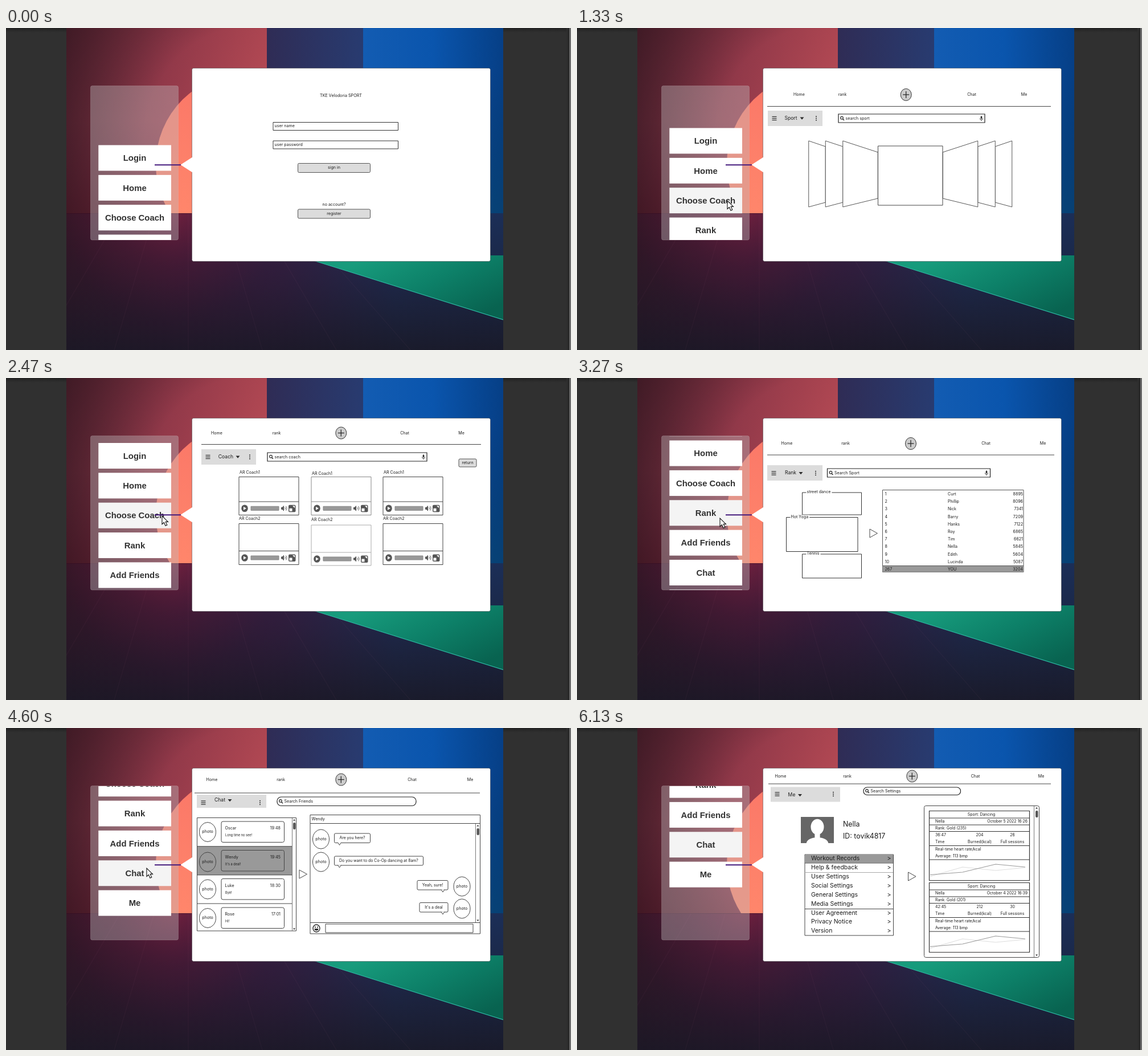
These frames come from a looping animation (992 by 565 pixels, 6.19 s). An HTML page with a canvas:

```html
<!DOCTYPE html>
<html lang="en">
<head>
<meta charset="utf-8">
<title>Sport menu</title>
<style>
html, body { margin: 0; width: 100%; height: 100%; overflow: hidden; background: #303030; }
canvas { display: block; }
</style>
</head>
<body>
<canvas id="stage" width="992" height="565"></canvas>
<script>
const view = document.getElementById('stage').getContext('2d');
const LOOP = 6190, STEP = 1000 / 15, PITCH = 52.35;
const INK = '#2b2b2b', GREY = '#999', LIGHT = '#dcdcdc';
let c = view;

// ---------- helpers ----------
function layer(draw) {
  const el = document.createElement('canvas');
  el.width = 992; el.height = 565;
  c = el.getContext('2d');
  draw();
  c = view;
  return el;
}

function blend(g, colors) {
  colors.forEach((col, i) => g.addColorStop(i / (colors.length - 1), col));
  return g;
}

function linear(x0, y0, x1, y1, ...colors) {
  return blend(c.createLinearGradient(x0, y0, x1, y1), colors);
}

function radial(x, y, r, ...colors) {
  return blend(c.createRadialGradient(x, y, 0, x, y, r), colors);
}

function fillRect(x, y, w, h, fill) {
  c.fillStyle = fill;
  c.fillRect(x, y, w, h);
}

function paint(fill, stroke, width = 1) {
  if (fill) { c.fillStyle = fill; c.fill(); }
  if (stroke) { c.strokeStyle = stroke; c.lineWidth = width; c.stroke(); }
}

function box(x, y, w, h, fill, stroke = INK, r = 0, width = 1) {
  c.beginPath();
  c.roundRect(x, y, w, h, r);
  paint(fill, stroke, width);
}

function oval(x, y, rx, ry, fill, stroke, width = 1) {
  c.beginPath();
  c.ellipse(x, y, rx, ry, 0, 0, Math.PI * 2);
  paint(fill, stroke, width);
}

function poly(pts, fill, stroke, width = 1, open = false) {
  c.beginPath();
  for (let i = 0; i < pts.length; i += 2) c.lineTo(pts[i], pts[i + 1]);
  if (!open) c.closePath();
  paint(fill, stroke, width);
}

function line(x0, y0, x1, y1, color = INK, width = 1) {
  poly([x0, y0, x1, y1], null, color, width, true);
}

function clipTo(x, y, w, h, draw) {
  c.save();
  c.beginPath();
  c.rect(x, y, w, h);
  c.clip();
  draw();
  c.restore();
}

function text(s, x, y, size = 7.1, align = 'left') {
  c.font = `${size}px Inter, sans-serif`;
  c.textAlign = align;
  c.textBaseline = 'middle';
  c.fillStyle = '#1c1c1c';
  c.fillText(s, x, y + 0.3);
}

// ---------- wireframe parts ----------
function nav(y, home, rank, plus, chat, me, x0, x1, ruleY, plusY = y) {
  text('Home', home, y, 7.1, 'center');
  text('rank', rank, y, 7.1, 'center');
  text('Chat', chat, y, 7.1, 'center');
  text('Me', me, y, 7.1, 'center');
  oval(plus, plusY, 9.5, 10.5, '#ccc', '#333');
  line(plus - 5.5, plusY, plus + 5.5, plusY, INK, 1.3);
  line(plus, plusY - 6, plus, plusY + 6, INK, 1.3);
  line(x0, ruleY, x1, ruleY, '#444');
}

function bar(x, y, w, h, label, labelX, arrowX, dotsX, labelY, iconY) {
  fillRect(x, y, w, h, LIGHT);
  for (let i = -1; i < 2; i++) {
    line(x + 7.5, iconY + i * 3, x + 15.5, iconY + i * 3, INK, 1.2);
    oval(dotsX, iconY + i * 3.2, 1, 1, INK);
  }
  text(label, labelX, labelY, 8.6, 'center');
  poly([arrowX - 3.5, labelY - 1.5, arrowX + 3.5, labelY - 1.5, arrowX, labelY + 2.8], INK);
}

function search(x, y, w, h, label, micX, r = 0) {
  box(x, y, w, h, '#fff', '#222', r, 1.2);
  const m = y + h / 2;
  oval(x + 6, m - 0.8, 2.3, 2.3, null, INK, 1.2);
  line(x + 7.6, m + 1, x + 10, m + 3.5, INK, 1.4);
  text(label, x + 12.5, m - 0.3);
  if (!micX) return;
  box(micX - 1.3, m - 4, 2.6, 5, INK, null, 1.3);
  c.beginPath();
  c.arc(micX, m, 2.7, 0, Math.PI);
  paint(null, INK, 0.8);
  line(micX, m + 2.5, micX, m + 4.5, INK, 0.9);
}

function button(x, y, w, h, label) {
  box(x, y, w, h, LIGHT, '#555', 2);
  text(label, x + w / 2, y + h / 2 - 0.5, 7.1, 'center');
}

function arrow(x, y) {
  poly([x, y - 7.5, x + 13.5, y, x, y + 7.5], '#fff', '#444');
}

function avatar(x, y, w, h) {
  const m = x + w / 2;
  fillRect(x, y, w, h, '#666');
  clipTo(x, y, w, h, () => {
    oval(m, y + h * 0.38, h * 0.25, h * 0.3, '#fff');
    fillRect(m - h * 0.1, y + h * 0.6, h * 0.2, h * 0.25, '#fff');
    oval(m, y + h * 1.02, h * 0.42, h * 0.24, '#fff');
  });
}

function photo(x, y) {
  oval(x, y, 14.5, 17, null, '#444');
  text('photo', x, y - 0.5, 7.1, 'center');
}

function scrollbar(x, y, w, h) {
  const m = x + w / 2;
  line(x, y, x, y + h, '#777');
  box(m - 2, y + 8, 4.5, 12, '#555', null, 2);
  poly([m - 2, y + 4.5, m + 2, y + 4.5, m, y + 2], INK);
  poly([m - 2, y + h - 4.5, m + 2, y + h - 4.5, m, y + h - 2], INK);
}

function player(x, y, h, split, edge) {
  box(x, y, 105, h, '#fff', edge);
  line(x, split, x + 105, split, edge);
  const m = (split + y + h) / 2;
  oval(x + 10, m, 5.8, 6.3, '#555');
  poly([x + 8, m - 3, x + 13, m, x + 8, m + 3], '#fff');
  box(x + 21, m - 3.5, 49, 7, GREY, '#888');
  poly([x + 74, m - 2, x + 76, m - 2, x + 79, m - 5, x + 79, m + 5, x + 76, m + 2, x + 74, m + 2], '#555');
  for (const r of [2.5, 5]) {
    c.beginPath();
    c.arc(x + 79, m, r, -0.9, 0.9);
    paint(null, '#555');
  }
  box(x + 87, m - 6, 12.5, 12.5, '#555', null, 2);
  fillRect(x + 88.5, m, 5, 5, '#fff');
  poly([x + 94, m - 4.5, x + 98, m - 4.5, x + 98, m - 0.5], '#fff');
}

function group(x, y, w, h, label) {
  box(x, y, w, h, '#fff', '#333');
  c.font = '7.1px Inter, sans-serif';
  fillRect(x + 7, y - 4, c.measureText(label).width + 3, 8, '#fff');
  text(label, x + 8, y - 1);
}

function bubble(x, y, w, h, label, right) {
  const tail = right ? x + w - 12 : x + 6;
  box(x, y, w, h, '#fff', '#444', 2);
  poly([tail, y + h - 0.6, tail + 3, y + h + 4, tail + 6, y + h - 0.6], '#fff', '#444', 1, true);
  text(label, x + w / 2, y + h / 2 - 0.5, 6.9, 'center');
}

// ---------- pages ----------
function loginPage() {
  text('TKE Velodoria SPORT', 588, 118.5, 7.2, 'center');
  box(469, 165.5, 219.5, 14, '#fff', '#333');
  text('user name', 471.5, 172);
  box(469, 198, 219.5, 14, '#fff', '#333');
  text('user password', 471.5, 205);
  button(512.5, 237.5, 127, 16, 'sign in');
  text('no account?', 576, 310, 7.1, 'center');
  button(512.5, 318, 127, 16, 'register');
}

function homePage() {
  nav(117, 390, 466, 577.7, 693, 785, 334, 832, 137.5);
  bar(335, 145, 96, 27, 'Sport', 375.5, 395, 420, 158, 158.5);
  search(459, 151, 257, 15, 'search sport', 710);
  for (const side of [-1, 1]) {
    for (let i = 2; i >= 0; i--) {
      const px = d => 585.25 + side * d;
      const outer = [118.5, 149, 178.5][i], inner = [57, 118.5, 149][i];
      const dip = i ? 10 : 20, lift = i ? 8 : 15;
      poly([px(outer), 198, px(inner), 198 + dip, px(inner), 314 - lift, px(outer), 314], '#fff', '#555');
    }
  }
  box(528.5, 207, 113.5, 104, '#fff', '#444');
}

function coachPage() {
  nav(96.5, 370, 475, 588.3, 700, 799.5, 343, 834, 116.5);
  bar(343, 125, 96, 27, 'Coach', 386, 407, 428, 138, 138.5);
  search(459, 131, 280, 15, 'search coach', 733);
  button(795, 142, 31, 14, 'return');
  [409, 536, 662].forEach((x, i) => {
    const mid = i === 1;
    text('AR Coach1', x + 1, mid ? 168 : 166);
    text('AR Coach2', x, mid ? 249 : 247);
    player(x, 173.5, 67, 217, mid ? '#888' : '#444');
    player(x, mid ? 258 : 255.5, mid ? 71 : 72, mid ? 306 : 303.5, mid ? '#aaa' : '#444');
  });
}

function rankPage() {
  nav(115, 368.5, 471.5, 586, 718, 818, 334, 838, 135);
  bar(334, 153, 97, 27, 'Rank', 375, 393, 419, 166.5, 167);
  search(439.5, 159, 286, 15, 'Search Sport', 719);
  group(395.5, 201, 104, 39, 'street dance');
  group(367.5, 244.5, 125.5, 60, 'Hot Yoga');
  group(395.5, 309, 104, 42, 'Tennis');
  arrow(514, 272.5);
  box(536.5, 196.5, 247.5, 144, '#fff', '#555');
  fillRect(536.5, 329, 247.5, 11.5, GREY);
  line(536.5, 329.5, 784, 329.5, '#555');
  const names = ['Curt', 'Phillip', 'Nick', 'Barry', 'Hanks', 'Roy', 'Tim', 'Nella', 'Edith', 'Lucinda', 'YOU'];
  const scores = [8895, 8096, 7341, 7209, 7122, 6865, 6621, 5845, 5604, 5087, 3204];
  names.forEach((name, i) => {
    const y = 203.5 + i * 13.2;
    text(i < 10 ? i + 1 : 267, 540.5, y);
    text(name, 651, y);
    text(scores[i], 783, y, 7.1, 'right');
  });
}

function friendsPage() {
  nav(127, 355.5, 461, 581.7, 707.5, 808, 334, 829, 139.5, 122);
  bar(335, 151, 121, 22.5, 'Add Friends', 389, 421, 445, 159.5, 164);
  box(462.5, 170, 248.5, 95.5, '#fff', '#333');
  search(462.5, 154.5, 248.5, 15.5, 'Nella');
  [
    ['Nella(You)', 'I like dancing!', 558.5, 191, 181],
    ['Nellako', 'Hey there! I am using Velodoria Sport', 528, 217.5, 210],
    ['Nellazila', 'Yoga is life', 560, 244, 236]
  ].forEach(([name, note, x, y, top]) => {
    text(name, 474, y);
    text(note, x, y, 6.8);
    avatar(688, top, 15, 16.5);
  });
  text('Lately Popular Players', 345.5, 299, 6.9);
  line(345.5, 306.5, 422, 306.5, '#444');
  const names = ['Conrad', 'Evan', 'Hugh', 'Ned', 'Ruby', 'Elena', 'Weilang', 'Jun'];
  [347, 405, 469.5, 535.5, 608, 674, 734, 797].forEach((x, i) => {
    box(x, 314, 25, 28, '#fff', '#333', 2, 1.3);
    text(names[i], x + 12.5, 347.5, 6.9, 'center');
  });
}

function chatPage() {
  nav(90.5, 361.5, 482.5, 588.3, 713, 815, 331, 832, 114);
  bar(335, 117, 122, 23, 'Chat', 375.5, 393, 446, 126.5, 131);
  search(476, 121, 244, 15.5, 'Search Friends', 0, 7);
  box(335.5, 157.5, 174, 198.5, '#fff', '#444');
  fillRect(336, 208, 166, 50, GREY);
  [
    ['Oscar', '19:48', 'Long time no see!', 164],
    ['Wendy', '19:45', "It's a deal!", 214.5],
    ['Luke', '18:30', 'Bye!', 264.5],
    ['Rose', '17:01', 'Hi!', 315]
  ].forEach(([name, time, note, y], i) => {
    if (i) line(335.5, 157.5 + i * 50.2, 502, 157.5 + i * 50.2, '#444');
    box(378, y, 110.5, 36.5, null, '#444', 3);
    photo(354, y + (i === 1 ? 20.5 : 18.5));
    text(name, 384.5, y + 12);
    text(time, 482, y + 12, 7.1, 'right');
    text(note, 385, y + 24.5, 5.6);
  });
  scrollbar(502.5, 158, 7, 198);
  arrow(515, 256.5);
  box(534, 152.5, 298.5, 208.5, '#fff', '#444');
  line(534, 167.5, 832, 167.5, '#444');
  text('Wendy', 536.5, 160);
  photo(553, 195);
  photo(553, 235);
  photo(800.5, 278);
  photo(800.5, 317);
  bubble(576.5, 185, 63, 16.5, 'Are you here?');
  bubble(576.5, 225, 156, 16, 'Do you want to do Co-Op dancing at 8am?');
  bubble(722, 267.5, 54, 16.5, 'Yeah, sure!', true);
  bubble(726, 306.5, 50, 16.5, "It's a deal", true);
  scrollbar(824.5, 168, 8, 173);
  line(534, 341.5, 832, 341.5, '#444');
  oval(545, 351.5, 6, 6.5, null, INK, 1.4);
  oval(543, 349.5, 0.9, 1.2, INK);
  oval(547, 349.5, 0.9, 1.2, INK);
  c.beginPath();
  c.arc(545, 352, 3.5, 0, Math.PI);
  paint(INK);
  box(561, 344, 259, 15, '#fff', '#444');
}

function record(y, rank, date, values) {
  box(618.5, y, 176, 122, '#fff', '#333', 0, 1.2);
  for (const d of [12.5, 24.5, 36, 61, 85.5]) line(618.5, y + d, 794.5, y + d, '#333');
  text('Sport: Dancing', 710, y + 6, 6.9, 'center');
  text('Nella', 629, y + 18.5, 6.9);
  text(date, 791, y + 18.5, 6.9, 'right');
  text(rank, 629, y + 30.5, 6.9);
  ['Time', 'Burned(kcal)', 'Full sessions'].forEach((label, i) => {
    const x = [629, 707, 764.5][i], align = i ? 'center' : 'left';
    text(values[i], x, y + 42.5, 6.9, align);
    text(label, x, y + 54.5, 6.9, align);
  });
  text('Real-time heart rate/kcal', 629, y + 67, 6.9);
  text('Average: 113 bmp', 629, y + 79, 6.9);
  poly([620, y + 115, 677, y + 98.5, 735, y + 104.5, 787, y + 99.5], null, '#ddd', 1.2, true);
  poly([620, y + 112, 677, y + 107.5, 735, y + 93.5, 787, y + 98.5], null, GREY, 1.2, true);
}

function mePage() {
  nav(84.5, 357.5, 474.5, 588.3, 699.5, 815, 336, 832, 98);
  bar(340, 103.5, 122, 26, 'Me', 377, 391.5, 450, 117.5, 116);
  search(503, 104, 170.5, 13.5, 'Search Settings', 0, 6.5);
  avatar(393, 156, 58, 46);
  text('Nella', 467, 169, 12.4);
  text('ID: tovik4817', 467, 190, 12.4);
  box(400, 222, 155.5, 142, '#fff', '#444');
  fillRect(400.5, 222.5, 154.5, 14, GREY);
  line(400, 237, 555, 237, '#444');
  line(400, 253.5, 555, 253.5, '#aaa');
  line(400, 317.5, 555, 317.5, '#444');
  ['Workout Records', 'Help & feedback', 'User Settings', 'Social Settings', 'General Settings',
    'Media Settings', 'User Agreement', 'Privacy Notice', 'Version'].forEach((label, i) => {
    text(label, 411, 229 + i * 15.85, 10.5);
    text('>', 548, 229 + i * 15.85, 10.5, 'center');
  });
  arrow(581.5, 260.5);
  box(609.5, 136.5, 202, 266, '#fff', '#444', 3);
  scrollbar(802.5, 137, 9, 265);
  record(145.5, 'Rank: Gold (235)', 'October 5 2022 16:26', ['36:47', '204', '26']);
  record(271.5, 'Rank: Gold (201)', 'October 4 2022 16:39', ['42:45', '212', '30']);
}

// ---------- backdrop ----------
function walls() {
  fillRect(106, 0, 352, 326, linear(106, 0, 458, 0, '#65293a', '#963b4b', '#b94c56'));
  fillRect(106, 0, 352, 326, linear(0, 0, 0, 326, 'rgba(60,15,40,.1)', 'rgba(60,15,40,0)', 'rgba(70,6,30,.3)'));
  fillRect(106, 0, 352, 326, radial(440, 190, 390, 'rgba(40,18,24,0)', 'rgba(40,18,24,0)', 'rgba(40,18,24,.6)'));
  fillRect(458, 0, 169, 326, linear(458, 0, 627, 0, '#2f2c55', '#283b70'));
  fillRect(627, 0, 246, 400, linear(627, 0, 873, 0, '#135cb2', '#0a55ad', '#063f86'));
  fillRect(627, 70, 246, 332, linear(0, 70, 0, 402, 'rgba(6,50,90,0)', 'rgba(8,70,105,.75)'));
  clipTo(106, 0, 300, 325, () => oval(423, 239, 160, 160, linear(0, 100, 0, 325, '#fb7868', '#ff866b')));
}

function ground() {
  fillRect(106, 325, 767, 240, linear(106, 0, 873, 0, '#361627', '#47183a', '#3a2048', '#20305c', '#1b2e57'));
  fillRect(106, 325, 420, 240, radial(290, 325, 190, 'rgba(150,40,65,.5)', 'rgba(130,35,62,.2)', 'rgba(130,35,62,0)'));
  fillRect(106, 325, 767, 240, linear(0, 325, 0, 565, 'rgba(25,24,37,0)', 'rgba(25,24,37,.4)', 'rgba(25,24,37,.88)'));
  for (let i = 0; i < 6; i++) line(200 + i * 60, 326, 60 + i * 130, 565, 'rgba(255,150,190,.03)', 1.5);
  line(106, 325.5, 326, 325.5, 'rgba(50,10,30,.5)');
  poly([535, 406.5, 851, 399, 873, 399, 873, 512], linear(640, 400, 720, 560, '#179b7c', '#0d8068', '#086350'));
  line(535, 406.5, 873, 512, '#2cb6a0', 1.2);
}

function backdrop() {
  fillRect(0, 0, 992, 565, '#303030');
  fillRect(0, 0, 992, 8, linear(0, 0, 0, 8, '#222', '#303030'));
  fillRect(984, 0, 5, 565, linear(984, 0, 989, 0, '#303030', '#242424'));
  fillRect(989, 0, 3, 565, '#6c6c6c');
  clipTo(106, 0, 767, 565, () => { walls(); ground(); });
  box(148.5, 101.5, 154, 270.5, 'rgba(190,185,188,.4)', 'rgba(210,190,195,.25)', 3);
  box(326.5, 70.5, 524, 339, '#fff', 'rgba(45,45,50,.45)', 3);
}

// ---------- motion ----------
// step, pointer x, pointer y, centre of the first menu item
const keys = [
  [0, 951, 158, 228], [1, 951, 158, 228], [5, 600, 370, 228], [9, 294, 345, 228], [11, 294, 345, 228],
  [14, 264, 333, 228], [20, 264, 303, 198], [25, 264, 303, 198], [34, 274, 242, 136.5], [37, 274, 242, 136.5],
  [43, 258, 303, 136.5], [49, 251, 246, 79.7], [52, 246, 342, 79.7], [57, 245, 305, 42.3],
  [63, 246, 249, -5], [68, 246, 249, -5], [69, 247, 246, -7], [72, 248, 190, -55], [76, 248, 190, -55],
  [82, 270, 52, -85], [86, 486, 364, -95], [92, 486, 364, -57], [94, 486, 364, -57]
];

function pose(k) {
  const i = keys.findIndex((key, n) => n && k <= key[0]);
  const a = keys[i - 1], b = keys[i];
  const f = (k - a[0]) / (b[0] - a[0]);
  return [1, 2, 3].map(n => a[n] + (b[n] - a[n]) * f);
}

const labels = ['Login', 'Home', 'Choose Coach', 'Rank', 'Add Friends', 'Chat', 'Me'];
const lit = { 2: [13, 42], 3: [42, 60], 5: [52, 94] };

function menu(top, k) {
  clipTo(149, 102, 153, 270, () => {
    c.font = 'bold 14.9px "Liberation Sans", Arial, sans-serif';
    c.textAlign = 'center';
    c.textBaseline = 'alphabetic';
    labels.forEach((label, i) => {
      const y = top + i * PITCH;
      const on = lit[i] && k >= lit[i][0] && k < lit[i][1];
      fillRect(162.3, y - 22.5, 127.7, 45, on ? '#f4f4f4' : '#fff');
      c.fillStyle = '#323232';
      c.fillText(label, 226, y + 5.2);
    });
  });
}

function pointer(x, y) {
  poly([x, y, x, y + 14.5, x + 3.4, y + 11.5, x + 6, y + 17.3, x + 8.8, y + 16, x + 6.2, y + 10.4, x + 10.5, y + 10.4],
    '#fff', '#111', 1.1);
}

const back = layer(backdrop);
const pages = [loginPage, homePage, coachPage, rankPage, friendsPage, chatPage, mePage].map(layer);

function draw(now) {
  const k = Math.floor((now % LOOP + 4) / STEP);
  const [x, y, top] = pose(k);
  const page = Math.min(6, Math.max(0, Math.floor((262 - top) / PITCH)));
  c.drawImage(back, 0, 0);
  c.drawImage(pages[page], 0, 0);
  menu(top, k);
  poly([306.5, 240, 327.5, 226.5, 327.5, 253.5], '#fff');
  line(261, 240.3, 307, 240.3, '#43197c', 2);
  if (k > 0 && k < 86) pointer(x, y);
}

const start = performance.now();
function tick() {
  draw(performance.now() - start);
  requestAnimationFrame(tick);
}
draw(0);
requestAnimationFrame(tick);
</script>
</body>
</html>
```
